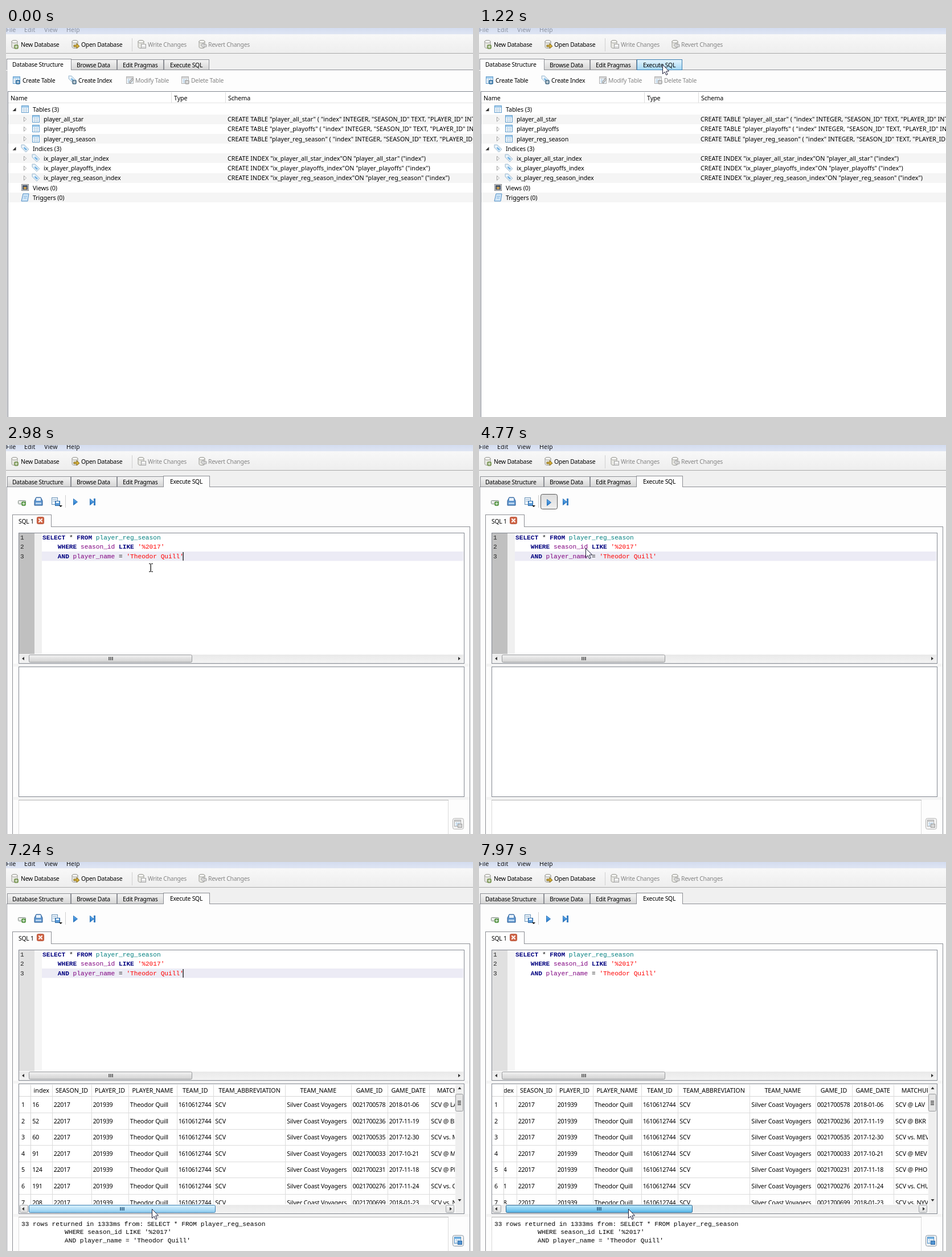
Write an HTML page with a canvas that moves like this. It is 820 px wide and 683 px high and loops after 8 s.

```html
<!DOCTYPE html>
<html>
<head>
<meta charset="utf-8">
<style>
html, body { margin: 0; width: 100%; height: 100%; overflow: hidden; background: #fdfdfd; }
canvas { display: block; }
</style>
</head>
<body>
<canvas id="stage" width="820" height="683"></canvas>
<script>
const g = document.getElementById('stage').getContext('2d');
const LOOP = 8000, PLAYER = 'Theodor Quill', TEAM = 'Silver Coast Voyagers', ABBR = 'SCV';
const BORDER = '#8c8e94', GREY = '#858585', BLUE = '#3c7fb1';
const MONO = '11.17px "Liberation Mono", monospace';

// ---------- drawing helpers ----------
function fade(y0, y1, a, b) {
  const f = g.createLinearGradient(0, y0, 0, y1);
  f.addColorStop(0, a);
  f.addColorStop(1, b);
  return f;
}
function box(x, y, w, h, fill, line) {
  if (fill) { g.fillStyle = fill; g.fillRect(x, y, w, h); }
  if (line) { g.strokeStyle = line; g.lineWidth = 1; g.strokeRect(x + .5, y + .5, w - 1, h - 1); }
}
function round(x, y, w, h, r, fill, line) {
  g.beginPath();
  g.roundRect(x + .5, y + .5, w - 1, h - 1, r);
  g.fillStyle = fill; g.fill();
  g.strokeStyle = line; g.lineWidth = 1; g.stroke();
}
function poly(points, fill, line) {
  g.beginPath();
  points.forEach(([x, y]) => g.lineTo(x, y));
  g.closePath();
  if (fill) { g.fillStyle = fill; g.fill(); }
  if (line) { g.strokeStyle = line; g.lineWidth = 1; g.stroke(); }
}
function text(s, x, y, color = '#000', size = 10.7, gap = -.08, align = 'left') {
  g.font = size + 'px "Noto Sans", sans-serif';
  g.letterSpacing = gap + 'px';
  g.textAlign = align;
  g.fillStyle = color;
  g.fillText(s, x, y);
}
const label = (s, x, y, color) => text(s, x, y, color, 10.4, -.25);
function code(s, x, y, color = '#000', bold = false) {
  g.font = (bold ? 'bold ' : '') + MONO;
  g.letterSpacing = '0px';
  g.textAlign = 'left';
  g.fillStyle = color;
  g.fillText(s, x, y);
}
function clip(x, y, w, h, draw) {
  g.save();
  g.beginPath();
  g.rect(x, y, w, h);
  g.clip();
  draw();
  g.restore();
}

// ---------- icons ----------
function plus(x, y, c = '#7f9a5c') {
  round(x - 4, y - 4, 8, 8, 2, c, c);
  box(x - 2.5, y - .5, 5, 1, '#fff');
  box(x - .5, y - 2.5, 1, 5, '#fff');
}
function cylinder(x, y) {
  g.lineWidth = 1;
  g.strokeStyle = '#9a9a94';
  g.fillStyle = '#e9e9e4';
  g.beginPath();
  g.ellipse(x + 5, y + 11, 5, 2.5, 0, 0, Math.PI);
  g.lineTo(x, y + 2);
  g.ellipse(x + 5, y + 2, 5, 2.2, 0, Math.PI, 0);
  g.closePath();
  g.fill(); g.stroke();
  g.beginPath();
  g.ellipse(x + 5, y + 2, 5, 2.2, 0, 0, 7);
  g.fillStyle = '#fafaf8';
  g.fill(); g.stroke();
}
function sheet(x, y, c = '#5f9bcb', head = '#a6cfee', size = 13) {
  box(x, y, size, size, '#f4f9fd', c);
  box(x + 1, y + 1, size - 2, 3, head);
  for (let i = 6; i < size - 1; i += 3) box(x + 2, y + i, size - 4, 1, '#b5cfe4');
  box(x + 4, y + 4, 1, size - 5, '#b5cfe4');
  box(x + 8, y + 4, 1, size - 5, '#b5cfe4');
}
function tag(x, y) {
  poly([[x, y], [x + 5, y], [x + 13, y + 8], [x + 8, y + 13], [x, y + 5]], '#dcebf6', '#a3bccf');
  poly([[x + 5, y + 4], [x + 10, y + 8], [x + 8, y + 10], [x + 4, y + 6]], '#6fb0e2');
  box(x + 2, y + 2, 2, 2, '#fff');
}
function arrowHead(x, y, dx, dy) {
  poly([[x + dx * 3, y + dy * 3], [x - dx - dy * 3, y - dy - dx * 3], [x - dx + dy * 3, y - dy + dx * 3]], '#333');
}

// ---------- window chrome ----------
function chrome(page, mouse, t) {
  box(0, 0, 820, 683, '#fdfdfd');
  box(0, 0, 820, 11, fade(0, 11, '#d3dcef', '#dfe5f3'));
  const menuColor = page ? '#111' : '#8d93a0';
  [['File', 0], ['Edit', 32], ['View', 67], ['Help', 106]].forEach(([s, x]) => text(s, x, 7, menuColor, 10.7, .1));
  box(0, 11, 820, 33, fade(11, 44, '#f8f8f8', '#eeeeee'));
  box(0, 44, 820, 1, '#a9a9a9');
  box(0, 45, 820, 28, '#f0f0f0');

  cylinder(10, 22); plus(18, 33);
  cylinder(116, 22);
  poly([[119, 30], [124, 30], [124, 27], [129, 32], [124, 36], [124, 33], [119, 33]], '#d4ad37', '#806a25');
  box(221, 18, 1, 23, '#d0d0d0');
  cylinder(232, 22); box(237, 28, 9, 8, '#dedede', '#a5a5a5'); box(239, 29, 5, 3, '#fff');
  cylinder(339, 22); poly([[342, 30], [347, 26], [347, 29], [352, 29], [352, 33], [347, 33], [347, 35]], '#d9d9d9', '#a2a2a2');
  label('New Database', 26, 33);
  label('Open Database', 132, 33);
  label('Write Changes', 249, 33, GREY);
  label('Revert Changes', 355, 33, GREY);

  box(1, 73, 819, 1, BORDER);
  box(1, 73, 1, 610, BORDER);
  const tabs = [['Database Structure', 2, 112, 11], ['Browse Data', 114, 81, 124], ['Edit Pragmas', 195, 82, 205], ['Execute SQL', 277, 80, 288]];
  const active = page ? 3 : 0;
  tabs.forEach(([s, x, w, tx], i) => {
    if (i === active) return;
    const hot = mouse && !page && mouse.y > 55 && mouse.y < 73 && mouse.x >= x && mouse.x < x + w;
    box(x, 55, w, 19, hot ? fade(56, 73, '#e4f4fd', '#a5d8f5') : fade(56, 73, '#f3f3f3', '#d6d6d6'), hot ? BLUE : BORDER);
    label(s, tx, 69);
  });
  const [s, x, w, tx] = tabs[active];
  box(x - 1, 54, w + 2, 21, '#fdfdfd');
  box(x - 1, 54, w + 2, 1, BORDER);
  box(x - 1, 54, 1, 20, BORDER);
  box(x + w, 54, 1, 20, BORDER);
  label(s, tx, 68);
}

// ---------- first page ----------
const ITEMS = ['player_all_star', 'player_playoffs', 'player_reg_season'];
const TREE = [
  ['Tables (3)', 0, 'sheet'],
  ...ITEMS.map(n => [n, 1, 'sheet', `CREATE TABLE "${n}" ( "index" INTEGER, "SEASON_ID" TEXT, "PLAYER_ID" INTEGER, "PLAYER_NAME" TEXT )`]),
  ['Indices (3)', 0, 'tag'],
  ...ITEMS.map(n => [`ix_${n}_index`, 1, 'tag', `CREATE INDEX "ix_${n}_index"ON "${n}" ("index")`]),
  ['Views (0)', 0, 'view'],
  ['Triggers (0)', 0, 'trigger']
];
function structurePage(mouse) {
  sheet(12, 85); plus(21, 95, '#3f7aa8');
  tag(110, 84); plus(120, 95, '#5f7f95');
  sheet(211, 85, '#b0b0b0', '#d5d5d5'); poly([[216, 95], [222, 88], [224, 90], [218, 97]], '#ccc', '#999');
  sheet(308, 85, '#b0b0b0', '#d5d5d5'); plus(318, 95, '#b0b0b0');
  label('Create Table', 29, 96);
  label('Create Index', 127, 96);
  label('Modify Table', 227, 96, GREY);
  label('Delete Table', 325, 96, GREY);

  box(3, 111, 818, 573, '#fff', '#828790');
  box(4, 131, 816, 1, '#e3e3e3');
  box(290, 113, 1, 18, '#dcdcdc');
  box(385, 113, 1, 18, '#dcdcdc');
  [['Name', 8], ['Type', 295], ['Schema', 390]].forEach(([s, x]) => text(s, x, 127));

  TREE.forEach(([name, depth, icon, sql], i) => {
    const y = 143 + i * 17.2, top = Math.round(y - 8.6);
    if (i % 2) box(4, top, 816, 17, '#f5f5f5');
    if (depth && mouse && Math.abs(mouse.y - y) < 8.6) box(42, top, 780, 17, fade(top, top + 17, '#f6fbff', '#e6f2fd'), '#b8d6fb');
    const x = 27 + depth * 19, iy = Math.round(y - 7);
    if (depth) poly([[31.5, y - 4], [35.5, y], [31.5, y + 4]], '#fff', '#a0a0a0');
    else if (i < 5) poly([[17.5, y - 3], [17.5, y + 3], [11.5, y + 3]], '#333');
    if (icon === 'sheet') sheet(x, iy);
    if (icon === 'tag') tag(x, iy);
    if (icon === 'view') {
      box(x, iy, 13, 12, '#d9d9d9', '#85888c');
      box(x + 2, iy + 2, 9, 8, '#44546b');
      box(x + 4, iy + 5, 5, 4, '#c49a50');
    }
    if (icon === 'trigger') {
      poly([[x + 3, iy], [x + 13, iy], [x + 11, iy + 13], [x, iy + 13]], '#cfe5f7', '#4f8ec6');
      box(x + 4, iy + 4, 6, 1, '#7fb2dd');
      box(x + 4, iy + 7, 5, 1, '#7fb2dd');
    }
    const base = Math.round(y + 4);
    text(name, depth ? 66 : 47, base, '#000', 10.7, -.1);
    if (sql) text(sql, 389, base, '#000', 10.7, .04);
  });
}

// ---------- second page ----------
function hScroll(x, y, w, from, to, state) {
  box(x, y, w, 15, fade(y, y + 15, '#e9e9e9', '#f3f3f3'));
  if (state) [x + 1, x + w - 16].forEach(bx => round(bx, y, 15, 14, 2, fade(y, y + 14, '#f6f6f6', '#d9d9d9'), '#a0a4a8'));
  arrowHead(x + 8, y + 7, -1, 0);
  arrowHead(x + w - 8, y + 7, 1, 0);
  const tones = [['#f4f4f4', '#cfcfcf', '#96989b'], ['#e0f4fe', '#8acbf0', BLUE], ['#c4ebfc', '#52b5e8', '#2c628b']][state];
  round(from, y, to - from, 14, 2, fade(y, y + 14, tones[0], tones[1]), tones[2]);
  const mid = Math.round((from + to) / 2);
  for (let i = -4; i < 4; i += 3) box(mid + i, y + 4, 2, 6, state ? '#3f6f92' : '#6b6b6b');
}

const NAVY = '#00007f', PURPLE = '#7f007f', RED = '#ff0000';
const QUERY = [
  [['SELECT', NAVY, 1], [' * '], ['FROM ', NAVY, 1], ['player_reg_season', '#007f7f']],
  [['    WHERE ', NAVY, 1], ['season_id ', PURPLE], ['LIKE ', NAVY, 1], ["'%2017'", RED]],
  [['    AND ', NAVY, 1], ['player_name', PURPLE], [' = '], [`'${PLAYER}'`, RED]]
];
const CARET = [[1850, 2380], [2980, 3630], [6160, 6690], [7220, 7560]];

function editor(t, mouse) {
  const done = t >= 5700, line = t < 2980 ? 0 : 2;
  box(22, 154, 783, 230, '#fff', '#828790');
  box(23, 155, 27, 212, done ? '#e0e0e0' : '#c0c0c0');
  box(50, 155, 13, 212, done ? '#f5f5f5' : '#f0f0f0');
  if (t < 7560) box(63, 155 + line * 16, 740, 16.5, '#ecebf5');
  QUERY.forEach((parts, i) => {
    const y = Math.round(166 + i * 16.4);
    code(i + 1, 25, y, '#222');
    let x = 64;
    parts.forEach(([s, c, b]) => { code(s, x, y, c, b); x += s.length * 6.7; });
  });
  if (CARET.some(([a, b]) => t >= a && t < b)) box(line ? 310.5 : 64, line ? 188 : 155, 1.2, 15, '#000');
  hScroll(23, 368, 780, 40, 327, mouse.y > 367 && mouse.y < 383 ? 1 : 0);
}

const EDGES = [43, 80.5, 149.5, 214.5, 299.5, 364, 490, 605.5, 669.5, 743, 820];
const HEADS = ['index', 'SEASON_ID', 'PLAYER_ID', 'PLAYER_NAME', 'TEAM_ID', 'TEAM_ABBREVIATION', 'TEAM_NAME', 'GAME_ID', 'GAME_DATE', 'MATCHUP'];
const GAMES = [
  [16, '0021700578', '2018-01-06', '@ LAV'], [52, '0021700236', '2017-11-19', '@ BKR'],
  [60, '0021700535', '2017-12-30', 'vs. MEV'], [91, '0021700033', '2017-10-21', '@ MEV'],
  [124, '0021700231', '2017-11-18', '@ PHO'], [191, '0021700276', '2017-11-24', 'vs. CHU'],
  [208, '0021700699', '2018-01-23', 'vs. NYV']
];
function results(t, mouse, drag) {
  const off = 15 * drag;
  clip(23, 391, 766, 210, () => {
    box(23, 411, 766, 1, '#d5d5d5');
    GAMES.forEach((_, i) => {
      const y = 426 + i * 28.6;
      text(i + 1, 27, Math.round(y + 4));
      box(23, Math.round(y + 14), 766, 1, '#dcdcdc');
    });
    box(43, 391, 1, 210, '#d5d5d5');
  });
  clip(44, 391, 744, 210, () => {
    EDGES.slice(1).forEach((right, i) => {
      const left = EDGES[i] - off;
      box(Math.round(right - off), 391, 1, 210, '#dcdcdc');
      text(HEADS[i], (left + right - off) / 2 + .5, 405, '#000', 10.7, 0, 'center');
      GAMES.forEach(([index, id, date, foe], r) => {
        const cell = [index, '22017', '201939', PLAYER, '1610612744', ABBR, TEAM, id, date, ABBR + ' ' + foe][i];
        const gap = /^\d/.test(cell) ? -.37 : -.1;
        text(cell, left + 3.3, Math.round(430 + r * 28.6), '#000', 10.7, gap);
      });
    });
  });
  box(789, 391, 15, 210, '#efefef');
  arrowHead(796.5, 398, 0, -1);
  arrowHead(796.5, 593, 0, 1);
  round(789, 407, 14, 31, 2, '#e4e4e4', '#96989b');
  for (let i = 0; i < 3; i++) box(793, 419 + i * 3, 6, 2, '#6b6b6b');
  box(789, 601, 15, 16, '#f0f0f0');
  const state = t >= 7560 ? 2 : mouse.y > 604 ? 1 : 0;
  hScroll(23, 602, 765, 40 + 7 * drag, 368 + 7 * drag, state);

  code('33 rows returned in 1333ms from: SELECT * FROM player_reg_season', 27, 639);
  code("WHERE season_id LIKE '%2017'", 103, 653);
  code(`AND player_name = '${PLAYER}'`, 103, 668);
}

function sqlPage(t, mouse, drag) {
  // icon row
  round(21, 97, 14, 7, 1, '#e9e9e9', '#7c8a80'); plus(31, 103, '#5d9a4c');
  poly([[50, 98], [53, 92], [61, 92], [64, 98], [64, 106], [50, 106]], '#5d94cc', '#2f5f96');
  box(53, 93, 8, 5, '#e8f1fa'); box(52, 101, 10, 3, '#b9d4ee');
  box(80, 92, 11, 13, '#eef5fb', '#6a92b6');
  box(82, 95, 7, 1, '#94b4d0'); box(82, 98, 7, 1, '#94b4d0');
  box(86, 98, 9, 9, '#5b9bd8', '#2f6aa5'); box(88, 99, 5, 3, '#e9f3fb');
  poly([[93, 106], [99, 106], [96, 109]], '#111');
  box(104, 88, 1, 22, '#cfcfcf');
  const pressed = t >= 4290 && t < 5700;
  const over = mouse.x > 108 && mouse.x < 138 && mouse.y > 86 && mouse.y < 113;
  if (pressed) round(108, 86, 30, 27, 3, fade(86, 113, '#dcdcdc', '#f0f0f0'), '#5a5a5a');
  else if (over) round(108, 86, 30, 27, 3, fade(86, 113, '#fdfdfd', '#e8e8e8'), '#a6a6a6');
  const d = pressed ? 1 : 0;
  const play = (x, y, w) => poly([[x, y], [x + w, y + 5.5], [x, y + 11]], fade(y, y + 11, '#6cb6f3', '#1c6fc4'), '#2a72b8');
  play(118.5 + d, 94.5 + d, 7);
  play(147.5, 94.5, 6.5);
  box(154, 94, 3, 12, '#4b95db', '#2a72b8');

  // inner tab and pane
  box(80, 143, 735, 1, BORDER);
  box(814, 143, 1, 540, BORDER);
  box(11, 122, 1, 561, BORDER);
  box(11, 122, 69, 1, BORDER);
  box(79, 122, 1, 22, BORDER);
  label('SQL 1', 22, 138);
  round(54, 126, 13, 13, 2, '#d2694b', '#b24f35');
  g.strokeStyle = '#fff';
  g.lineWidth = 1.8;
  g.beginPath();
  g.moveTo(57.5, 129.5); g.lineTo(63.5, 135.5);
  g.moveTo(63.5, 129.5); g.lineTo(57.5, 135.5);
  g.stroke();

  editor(t, mouse);
  box(13, 384, 801, 5, '#f4f4f4');
  box(22, 389, 783, 229, '#fff', '#828790');
  box(13, 618, 801, 5, '#f4f4f4');
  box(22, 623, 755, 61, '#fff', '#dadada');
  box(22, 623, 755, 1, '#b4b4b4');
  const done = t >= 5700;
  round(784, 655, 20, 20, 3, '#f2f2f2', done ? '#8a9aa8' : '#b5b5b5');
  sheet(787, 658, done ? '#4a8fc8' : '#aaa', done ? '#7db8e6' : '#d0d0d0', 12);
  box(793, 665, 8, 7, done ? '#4f93d2' : '#d6d6d6', done ? '#2f6aa5' : '#9c9c9c');
  if (done) results(t, mouse, drag);
}

// ---------- pointer ----------
// [start, end, steps, points]; the pointer rests between moves
const MOVES = [
  [130, 840, 10, [[754, 708], [652, 610], [550, 516], [444, 391], [396, 320], [364, 266], [322, 206], [272, 140], [226, 96], [195, 73], [178, 61]]],
  [970, 970, 1, [[178, 61], [191, 65]]],
  [1120, 1220, 2, [[191, 65], [262, 64], [322, 64]]],
  [2130, 2520, 6, [[322, 64], [306, 100], [270, 186], [254, 215]]],
  [3630, 4140, 8, [[254, 215], [180, 146], [135, 107], [125, 98]]],
  [4540, 4770, 4, [[125, 98], [150, 130], [187, 181]]],
  [5700, 5700, 1, [[187, 181], [189, 182]]],
  [6160, 6950, 11, [[189, 182], [217, 332], [240, 480], [253, 603]]],
  [7030, 7240, 3, [[253, 603], [256, 609]]],
  [7560, 7970, 5, [[256, 609], [262, 609]]]
];
function progress(t, [start, end, n]) {
  if (t < start) return 0;
  if (t >= end) return 1;
  return (Math.floor((t - start) / (end - start) * (n - 1) + 1e-6) + 1) / n;
}
function pointerAt(t) {
  const move = MOVES.filter(m => t >= m[0]).pop();
  if (!move) return null;
  const pts = move[3], p = progress(t, move) * (pts.length - 1);
  const i = Math.min(Math.floor(p), pts.length - 2), k = p - i;
  return { x: Math.round(pts[i][0] + (pts[i + 1][0] - pts[i][0]) * k), y: Math.round(pts[i][1] + (pts[i + 1][1] - pts[i][1]) * k) };
}
function drawPointer({ x, y }, t) {
  const beam = t >= 1850 && !(t >= 4290 && t < 5700) && x > 63 && y > 155 && y < 367;
  if (beam) {
    box(x - .5, y - 6, 1.3, 13, '#111');
    box(x - 3, y - 7, 3, 1, '#111'); box(x + 1, y - 7, 3, 1, '#111');
    box(x - 3, y + 7, 3, 1, '#111'); box(x + 1, y + 7, 3, 1, '#111');
  } else {
    const shape = [[0, 0], [0, 16], [3.7, 12.6], [6.2, 18], [8.6, 17], [6.2, 11.6], [11, 11.3]];
    poly(shape.map(([a, b]) => [x + a + .5, y + b + .5]), '#fff', '#1c1c38');
  }
}

function draw(t) {
  const mouse = pointerAt(t), page = t >= 1850 ? 1 : 0;
  chrome(page, mouse, t);
  if (page) sqlPage(t, mouse, progress(t, MOVES[MOVES.length - 1]));
  else structurePage(mouse);
  if (mouse) drawPointer(mouse, t);
}

const begin = performance.now();
function tick() {
  draw((performance.now() - begin) % LOOP);
  requestAnimationFrame(tick);
}
tick();
</script>
</body>
</html>
```
